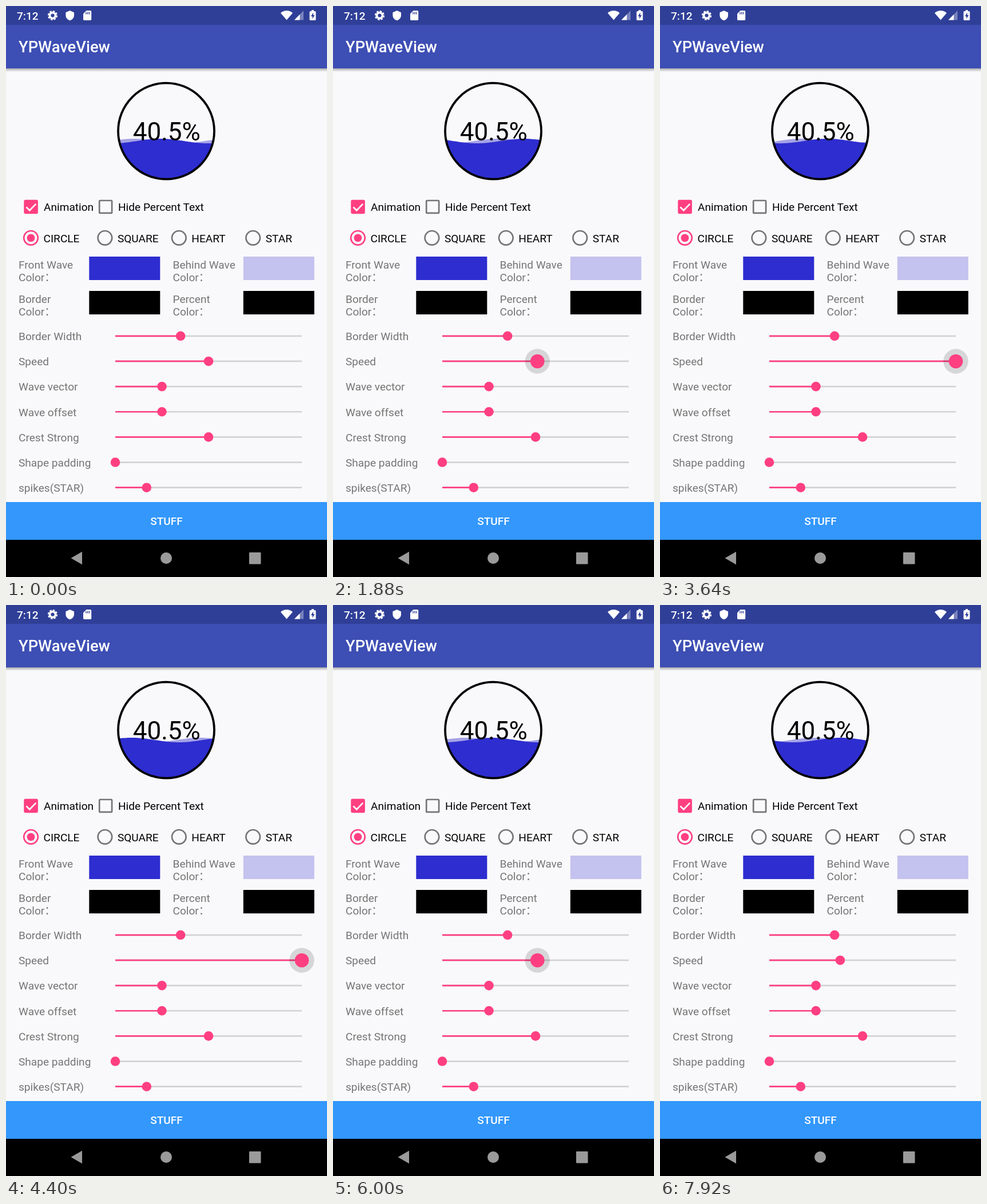
An HTML page for the animation above (8 s loop, 561 px wide and 998 px high).

```html
<!DOCTYPE html>
<html lang="zh-CN">
<head>
<meta charset="utf-8">
<title>YPWaveView</title>
<style>
  html, body { margin: 0; width: 100%; height: 100%; overflow: hidden; background: #f9f9fb; }
  svg { display: block; width: 561px; height: 998px; font: 19.1px Roboto, "Noto Sans CJK SC", sans-serif; }
  .label { fill: #757575; }
  .medium { font-weight: 500; fill: #fff; }
</style>
</head>
<body>
<svg id="stage" viewBox="0 0 561 998">
  <defs>
    <linearGradient id="shade" x2="0" y2="1">
      <stop stop-color="#000" stop-opacity=".32"/>
      <stop offset="1" stop-color="#000" stop-opacity="0"/>
    </linearGradient>
    <clipPath id="disc"><circle cx="280" cy="218.7" r="84"/></clipPath>
  </defs>

  <rect width="561" height="998" fill="#f9f9fb"/>
  <rect y="109" width="561" height="6" fill="url(#shade)"/>
  <rect y="33" width="561" height="76" fill="#3d4eb4"/>
  <rect width="561" height="33" fill="#2f3f98"/>
  <rect y="867" width="561" height="66" fill="#3397fc"/>
  <rect y="933" width="561" height="65"/>

  <!-- status bar -->
  <text class="medium" x="19" y="24">7:12</text>
  <g fill="none" stroke="#fff">
    <circle cx="81.5" cy="16.5" r="4.9" stroke-width="3.6"/>
    <circle cx="81.5" cy="16.5" r="7.3" stroke-width="2.6" stroke-dasharray="3.5 2.233"/>
  </g>
  <g fill="#fff">
    <path d="M111.700 8l7.300 3.200v5c0 4.400-3 7.800-7.300 9-4.300-1.200-7.300-4.600-7.300-9v-5z"/>
    <path d="M140.500 8h7q1.700 0 1.700 1.700v13.600q0 1.700-1.700 1.700h-10.800q-1.700 0-1.700-1.700V13.500z"/>
    <path d="M480 12.300q10.500-8.400 21 0L490.500 24.500z"/>
    <path d="M520 8v16.500h-16z" opacity=".35"/>
    <path d="M513.500 14.700v9.800H504z"/>
    <path d="M534 9v-2h4v2h2q1.500 0 1.500 1.500v13q0 1.500-1.500 1.500h-8q-1.500 0-1.500-1.500v-13q0-1.500 1.500-1.500z"/>
  </g>
  <path d="M140 10.500v4m2.800-4v4m2.800-4v4" stroke="#2f3f98" stroke-width="1.4"/>
  <path d="M537 11.500l-4 6.500h2.500v4.500l4-6.500H537z" fill="#2f3f98"/>
  <text class="medium" x="22" y="81.300" font-size="27.3">YPWaveView</text>

  <!-- wave gauge -->
  <g clip-path="url(#disc)">
    <path id="behind" fill="#a5a2e6"/>
    <path id="front" fill="#2e2dd0"/>
  </g>
  <circle cx="280" cy="218.700" r="84" fill="none" stroke="#000" stroke-width="3.8"/>
  <text x="280.700" y="235" font-size="44" text-anchor="middle">40.5%</text>

  <!-- check boxes -->
  <rect x="31.300" y="338.700" width="24.600" height="24.600" rx="2.700" fill="#ff3f80"/>
  <path d="M35.500 351.500l5.800 5.800 11-11.400" fill="none" stroke="#fff" stroke-width="2.7"/>
  <rect x="163.200" y="340" width="21.900" height="21.900" rx="1.500" fill="none" stroke="#757575" stroke-width="2.7"/>
  <text x="66" y="358">Animation</text>
  <text x="196" y="358">Hide Percent Text</text>

  <g id="controls"></g>

  <text class="medium" x="280.500" y="907" text-anchor="middle">STUFF</text>
  <g fill="#9a9a9a">
    <path d="M113.500 965L133 953.800v22.400z"/>
    <circle cx="280" cy="965" r="10"/>
    <rect x="425" y="955" width="20.500" height="20.500" rx="1"/>
  </g>
</svg>
<script>
const LOOP = 8000, FRAME = 40;
const PINK = '#ff3f80', GRAY = '#757575';
const TRACK = { left: 191, right: 517, top: 576.8, pitch: 44.15 };
const WAVE = { level: 236, amplitude: 4, length: 165, peak: 270, lag: 46, stepAngle: 0.5 };

// [ms, value]: speed setting in percent, wave steps taken, touch feedback
const SPEED = [[0, 50], [1850, 50], [2560, 71], [2720, 75], [3520, 100], [4400, 100], [4440, 99],
  [4960, 74], [5240, 64], [6000, 51], [6160, 49], [7040, 46], [7600, 38], [LOOP, 38]];
const STEPS = [[0, 0], [1000, 19], [2480, 38], [2560, 39], [2720, 40], [3640, 52], [4960, 65],
  [6000, 76], [6160, 77], [6320, 78], [7920, 104], [LOOP, 105]];
const PRESS = [[0, 0], [1720, 0], [1880, 1], [7560, 1], [7760, 0], [LOOP, 0]];

const byId = id => document.getElementById(id);
const controls = byId('controls');

function add(tag, attrs, text = '') {
  const node = document.createElementNS('http://www.w3.org/2000/svg', tag);
  for (const key in attrs) node.setAttribute(key, attrs[key]);
  node.textContent = text;
  return controls.appendChild(node);
}

['CIRCLE', 'SQUARE', 'HEART', 'STAR'].forEach((name, i) => {
  const cx = 43.5 + 129.4 * i, cy = 405.3, color = i ? GRAY : PINK;
  add('circle', { cx, cy, r: 12.3, fill: 'none', stroke: color, 'stroke-width': 2.7 });
  if (!i) add('circle', { cx, cy, r: 6.9, fill: color });
  add('text', { x: cx + 22, y: 412.5 }, name);
});

[['Front Wave', '#2e2dd0'], ['Behind Wave', '#c4c2ee'], ['Border', '#000'], ['Percent', '#000']]
  .forEach(([name, fill], i) => {
    const dx = i % 2 * 269.5, dy = (i >> 1) * 60;
    add('text', { class: 'label', x: 22 + dx, y: 459 + dy }, name);
    add('text', { class: 'label', x: 22 + dx, y: 481.300 + dy }, 'Color：');
    add('rect', { x: 145.3 + dx, y: 438 + dy, width: 124, height: 41, fill });
  });

function addSlider(name, percent, row) {
  const y = TRACK.top + TRACK.pitch * row;
  const line = (stroke, x2) =>
    add('line', { x1: TRACK.left, x2, y1: y, y2: y, stroke, 'stroke-width': 2.7 });
  add('text', { class: 'label', x: 22, y: y + 7.3 }, name);
  line('#d3d3d5', TRACK.right);
  const bar = line(PINK, TRACK.left);
  const halo = add('circle', { cy: y, r: 21.7, opacity: 0 });
  const thumb = add('circle', { cy: y, r: 8.3, fill: PINK });
  const slider = {
    set(value, press = 0) {
      const x = TRACK.left + (TRACK.right - TRACK.left) * value / 100;
      bar.setAttribute('x2', x);
      halo.setAttribute('cx', x);
      halo.setAttribute('opacity', 0.14 * press);
      thumb.setAttribute('cx', x);
      thumb.setAttribute('r', 8.3 + 4 * press);
    }
  };
  slider.set(percent);
  return slider;
}

const sliders = [['Border Width', 35], ['Speed', 50], ['Wave vector', 25], ['Wave offset', 25],
  ['Crest Strong', 50], ['Shape padding', 0], ['spikes(STAR)', 16.8]]
  .map(([name, percent], row) => addSlider(name, percent, row));

function valueAt(table, t) {
  const i = table.findIndex(([time]) => time > t);
  const [t0, v0] = table[i - 1], [t1, v1] = table[i];
  return v0 + (v1 - v0) * (t - t0) / (t1 - t0);
}

function wavePath(peak) {
  let d = 'M190 310';
  for (let x = 190; x <= 370; x += 3) {
    const y = WAVE.level - WAVE.amplitude * Math.cos((x - peak) / WAVE.length * 2 * Math.PI);
    d += `L${x} ${y.toFixed(2)}`;
  }
  return d + 'L370 310Z';
}

function render(time) {
  const t = Math.floor(time % LOOP / FRAME) * FRAME;
  const steps = Math.floor(valueAt(STEPS, t) + 1e-6);
  const peak = WAVE.peak + steps * WAVE.stepAngle / (2 * Math.PI) * WAVE.length;
  byId('front').setAttribute('d', wavePath(peak));
  byId('behind').setAttribute('d', wavePath(peak - WAVE.lag));
  sliders[1].set(Math.round(valueAt(SPEED, t)), valueAt(PRESS, t));
}

const start = performance.now();
function tick() {
  render(performance.now() - start);
  requestAnimationFrame(tick);
}
tick();
</script>
</body>
</html>
```
